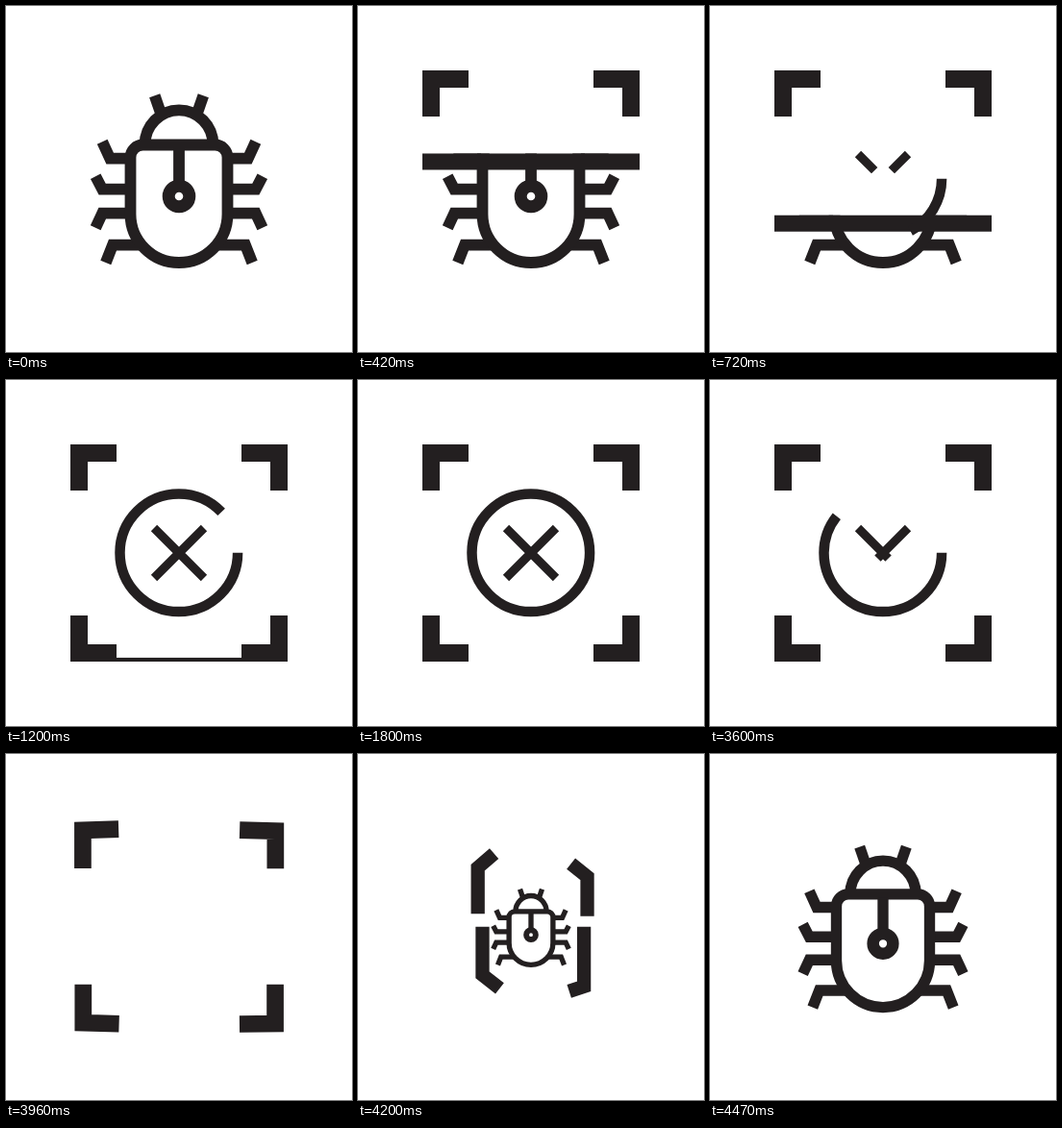
Recreate the animation shown at these times as an HTML page. Size 360x360 px, loop 4500 ms.

```html
<!DOCTYPE html>
<html lang="en">
<head>
<meta charset="utf-8">
<title>Bug scan</title>
<style>
  html, body { margin: 0; width: 100%; height: 100%; overflow: hidden; background: #fff; }
  svg { display: block; width: 100%; height: 100%; }
  .line { fill: none; stroke: #231f20; }
  .solid { fill: #231f20; }
</style>
</head>
<body>
<svg viewBox="0 0 360 360">
  <defs>
    <clipPath id="below"><rect id="belowBox" width="360" height="360"/></clipPath>
    <clipPath id="above"><rect id="aboveBox" width="360" height="360"/></clipPath>
    <g id="limbs">
      <path d="M154.7 93.3L160.5 110"/>
      <path d="M100.2 141.2L108.2 158.7H128"/>
      <path d="M93.2 177.2L100.2 190.7H128"/>
      <path d="M93.2 230.7L100.2 215.7H128"/>
      <path d="M103.8 267L111 248.7H140"/>
    </g>
  </defs>
  <g clip-path="url(#below)">
    <g id="bug" class="line" stroke-width="11.8">
      <use href="#limbs"/>
      <use href="#limbs" transform="matrix(-1 0 0 1 360 0)"/>
      <path d="M144.5 144.5A35.5 36.2 0 0 1 215.5 144.5"/>
      <path d="M142.5 144.5H217.5A13 13 0 0 1 230.5 157.5V216.5A50.5 50.5 0 0 1 129.5 216.5V157.5A13 13 0 0 1 142.5 144.5Z"/>
      <path d="M180 148V187"/>
      <circle cx="180" cy="198" r="10.8" stroke-width="13"/>
    </g>
  </g>
  <g clip-path="url(#above)"><path id="frame" class="line"/></g>
  <rect id="bar" class="solid" x="67" width="226"/>
  <circle id="ring" class="line" cx="179.8" cy="179.8" r="61.3" stroke-width="10.5" pathLength="1"/>
  <path id="cross" class="line" stroke-width="9"/>
</svg>
<script>
  const LOOP = 4500, TOP = 67, BOTTOM = 293, BAR = 17;
  const el = id => document.getElementById(id);
  const set = (id, attrs) => {
    for (const k in attrs) el(id).setAttribute(k, attrs[k]);
  };
  const show = (id, on) => set(id, { visibility: on ? "visible" : "hidden" });
  const ramp = (t, a, b) => Math.min(1, Math.max(0, (t - a) / (b - a)));
  const mix = (a, b, q) => a + (b - a) * q;
  const easeOut = u => 1 - (1 - u) ** 4;

  // Bracket centre line at rest: a corner with two arms of equal length
  const EDGE = 76, ARM = 39;

  // One bracket: mirror signs, folded corner, foot height, reach of the bent arm
  const brackets = [
    { sx: 1, sy: 1, x: 124.5, y: 118, foot: 166, dx: 17, dy: -14.5 },
    { sx: -1, sy: 1, x: 238.7, y: 127.5, foot: 168.5, dx: -17, dy: -13.5 },
    { sx: 1, sy: -1, x: 129.3, y: 230, foot: 180, dx: 18, dy: 14 },
    { sx: -1, sy: -1, x: 235.3, y: 242, foot: 180, dx: -15.5, dy: 5 }
  ];

  function bracketPath(b, q) {
    const rest = s => 180 - s * (180 - EDGE);
    const x = mix(rest(b.sx), b.x, q), y = mix(rest(b.sy), b.y, q);
    const dx = mix(b.sx * ARM, b.dx, q), dy = b.dy * q;
    const foot = mix(rest(b.sy) + b.sy * ARM, b.foot, q);
    return `M${x + dx} ${y + dy}L${x} ${y}V${foot}`;
  }

  function draw(t) {
    // Scanning bar
    const u = ramp(t, 40, 1240);
    const y = TOP - BAR + (BOTTOM - TOP + BAR) * (u + 0.5 * u * (1 - u));
    const y0 = Math.max(TOP, y), y1 = Math.min(BOTTOM, y + BAR);
    const scanning = u > 0 && u < 1;
    show("bar", scanning);
    set("bar", { y: y0, height: Math.max(0, y1 - y0) });

    // Bug: wiped by the bar, grows back at the end
    const growing = t > 3960;
    const scale = growing ? ramp(t, 3960, 4492) : 1;
    show("bug", growing || u < 1);
    set("bug", { transform: `translate(180 180) scale(${scale}) translate(-180 -180)` });
    set("belowBox", { y: scanning ? y0 : 0 });

    // Brackets: uncovered by the bar, later folding inward
    const fold = Math.max(0, (t - 3940) / 260);
    show("frame", u > 0 && t < 4245);
    set("frame", {
      d: brackets.map(b => bracketPath(b, fold)).join(""),
      "stroke-width": mix(18, 14.3, fold)
    });
    set("aboveBox", { height: scanning ? y1 : 360 });

    // Ring and cross
    const left = 1 - ramp(t, 3375, 3950);
    const ring = easeOut(ramp(t, 660, 1980)) * left;
    const d = 52 * easeOut(ramp(t, 660, 1300)) * left;
    show("ring", ring > 0);
    set("ring", { "stroke-dasharray": ring < 1 ? `${ring} 2` : "none" });
    show("cross", d > 0);
    set("cross", { d: `M154 154l${d} ${d}M206 154l${-d} ${d}` });
  }

  const start = performance.now();
  function tick() {
    draw((performance.now() - start) % LOOP);
    requestAnimationFrame(tick);
  }
  draw(0);
  requestAnimationFrame(tick);
</script>
</body>
</html>
```
